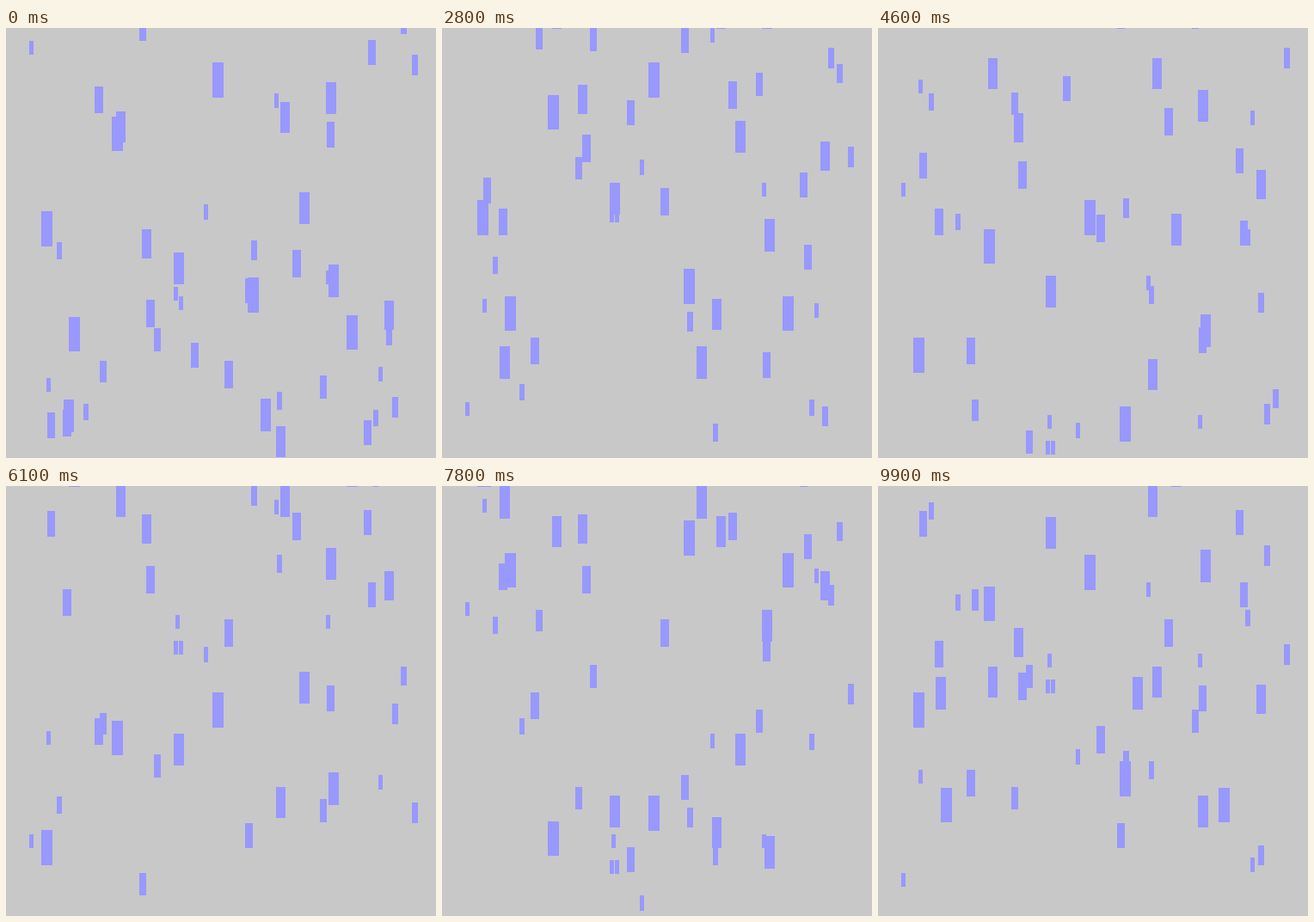
These frames come from a looping animation (500 by 500 pixels, 10 s). An HTML page:

```html
<!DOCTYPE html>
<html lang="en">
<head>
<meta charset="utf-8">
<title>Falling bars</title>
<style>
  html, body { margin: 0; width: 100%; height: 100%; overflow: hidden; background: #c8c8c8; }
  svg { display: block; width: 100%; height: 100%; }
</style>
</head>
<body>
<svg id="stage" viewBox="0 0 500 500" fill="#9898ff" shape-rendering="crispEdges"></svg>
<script>
const STEP_MS = 100;
const STEPS = 100;
const FLOOR = 495;

// Bar size -> starting [x, top]. A bar falls by its own size each step.
const STARTS = {
  15: [[27, 15], [195, 301], [201, 312], [372, 282], [47, 407], [197, 278]],
  16: [[312, 76], [433, 394]],
  17: [[230, 205]],
  18: [[90, 437], [427, 444]],
  19: [[59, 249]],
  20: [[315, 423]],
  21: [[459, -15]],
  22: [[285, 247], [442, 346]],
  23: [[472, 31], [449, 429]],
  24: [[109, 387]],
  25: [[155, -11]],
  26: [[172, 349], [365, 404]],
  28: [[421, 14], [278, 291], [215, 366], [416, 456]],
  29: [[373, 109], [48, 447]],
  30: [[103, 68], [66, 444]],
  31: [[333, 258], [163, 316], [254, 387]],
  33: [[158, 234], [440, 317]],
  35: [[128, 97], [319, 86], [314, 463]],
  36: [[372, 63], [341, 191], [195, 261]],
  37: [[375, 275], [67, 432], [296, 431]],
  39: [[123, 103], [73, 336], [396, 334]],
  40: [[240, 40], [41, 213], [281, 290]]
};

const stage = document.getElementById('stage');

function makeBar(size, x, top) {
  const node = document.createElementNS('http://www.w3.org/2000/svg', 'rect');
  node.setAttribute('x', x);
  node.setAttribute('width', Math.floor(size / 3));
  node.setAttribute('height', size + 1);
  stage.appendChild(node);
  return { node, size, top };
}

const bars = Object.entries(STARTS).flatMap(([size, places]) =>
  places.map(([x, top]) => makeBar(Number(size), x, top)));

// A bar whose bottom would pass the floor restarts just above the stage.
function topAt({ size, top }, step) {
  const firstWrap = Math.max(1, Math.floor((FLOOR - top - size) / size) + 1);
  if (step < firstWrap) return top + step * size;
  const period = Math.floor(FLOOR / size) + 2;
  return ((step - firstWrap) % period - 2) * size;
}

let shown = -1;

function draw() {
  const step = Math.floor(performance.now() / STEP_MS) % STEPS;
  if (step !== shown) {
    for (const bar of bars) bar.node.setAttribute('y', topAt(bar, step));
    shown = step;
  }
  requestAnimationFrame(draw);
}

draw();
</script>
</body>
</html>
```
